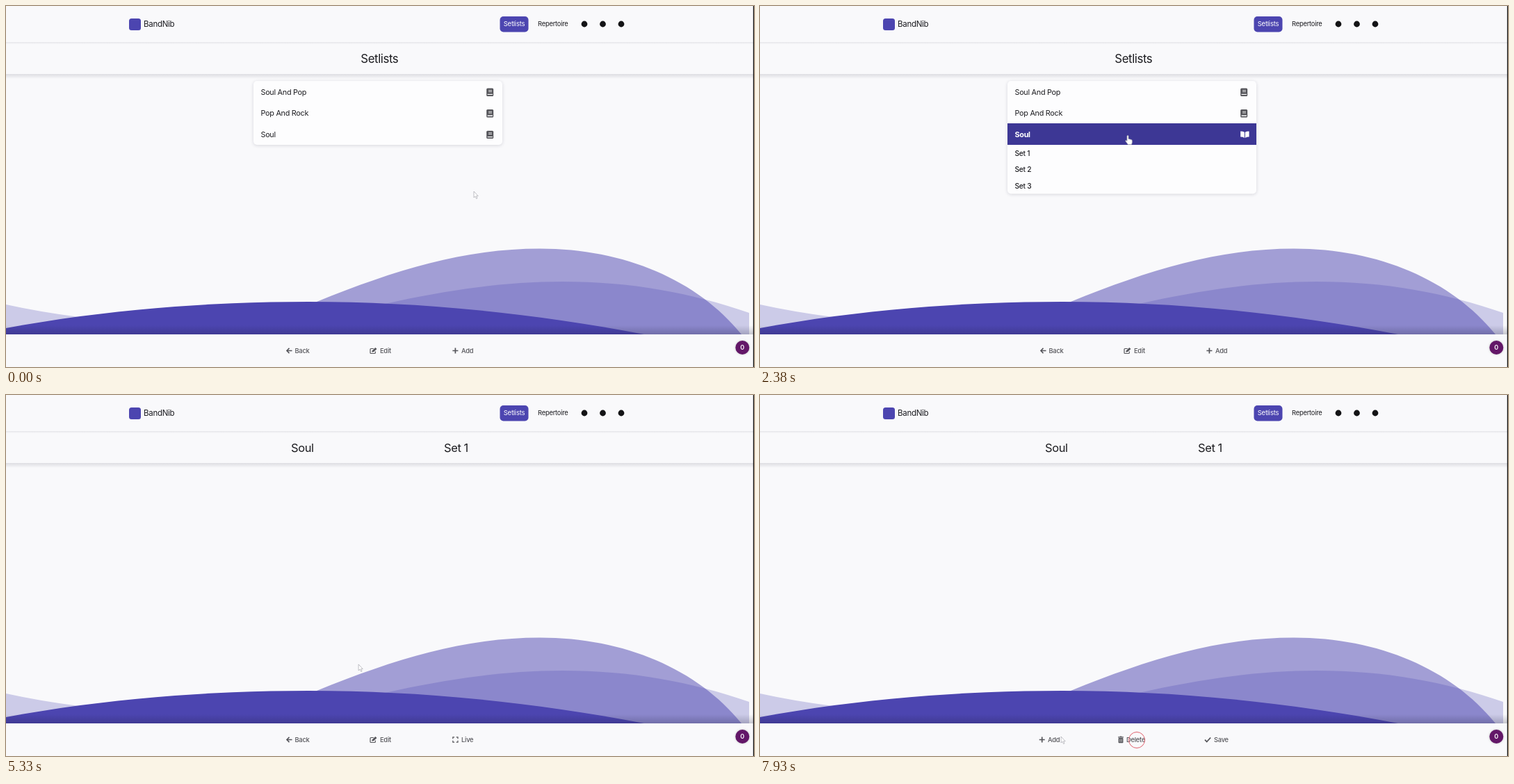
Recreate the animation shown at these times as an HTML page with a canvas. Size 1076 px wide and 520 px high, loop 8000 ms.

```html
<!DOCTYPE html>
<html lang="en">
<head>
<meta charset="utf-8">
<title>Setlists</title>
<style>
  html, body { margin: 0; width: 100%; height: 100%; overflow: hidden; background: #f9f9fb; }
  canvas { display: block; width: 1076px; height: 520px; }
</style>
</head>
<body>
<canvas id="stage"></canvas>
<script>
const W = 1076, H = 520, LOOP = 8000;
const PURPLE = '#4c45b0', DARK = '#3d3795', PAPER = '#f9f9fb', INK = '#1c1c20', GREY = '#55555a';
const OPEN_AT = 1950, SET_AT = 3830, EDIT_AT = 7000;

const canvas = document.getElementById('stage');
const ctx = canvas.getContext('2d');
const dpr = window.devicePixelRatio || 1;
canvas.width = W * dpr;
canvas.height = H * dpr;

// Cursor tip: time, x, y
const track = [
  [0, 673, 267], [200, 673, 267], [1250, 553, 191], [1450, 553, 191],
  [1750, 546, 183], [2050, 546, 183], [2380, 528, 187], [2850, 451, 216],
  [4700, 451, 216], [5800, 543, 498], [7400, 543, 498], [7900, 433, 492], [LOOP, 433, 492]
];
// Click rings: start, end, x, y
const clicks = [[1780, 2100, 546, 184], [3480, 3780, 452, 217], [6750, LOOP, 542, 497]];

const clamp = v => Math.max(0, Math.min(1, v));
const ease = v => v * v * (3 - 2 * v);

function cursorAt(t) {
  let i = 0;
  while (i < track.length - 2 && t >= track[i + 1][0]) i++;
  const [t0, x0, y0] = track[i], [t1, x1, y1] = track[i + 1];
  const k = ease(clamp((t - t0) / (t1 - t0)));
  return { x: x0 + (x1 - x0) * k, y: y0 + (y1 - y0) * k };
}

function inside(p, x, y, w, h) {
  return p.x >= x && p.x <= x + w && p.y >= y && p.y <= y + h;
}

function rect(x, y, w, h, color, r = 0) {
  ctx.fillStyle = color;
  ctx.beginPath();
  ctx.roundRect(x, y, w, h, r);
  ctx.fill();
}

function disc(x, y, r, color) {
  ctx.fillStyle = color;
  ctx.beginPath();
  ctx.arc(x, y, r, 0, 7);
  ctx.fill();
}

function text(str, x, mid, size, color = INK, weight = 400, align = 'left') {
  ctx.font = `${weight} ${size}px Inter, "Open Sans", sans-serif`;
  ctx.letterSpacing = `${-0.025 * size}px`;
  ctx.textAlign = align;
  ctx.fillStyle = color;
  ctx.fillText(str, x, mid + size * 0.36);
}

function stroke(d, color, width = 1.4) {
  ctx.strokeStyle = color;
  ctx.lineWidth = width;
  ctx.stroke(new Path2D(d));
}

function fill(d, color) {
  ctx.fillStyle = color;
  ctx.fill(new Path2D(d));
}

function at(x, y, draw) {
  ctx.save();
  ctx.translate(x, y);
  draw();
  ctx.restore();
}

function fade(y, h, from, to) {
  const g = ctx.createLinearGradient(0, y, 0, y + h);
  g.addColorStop(0, `rgba(20,20,45,${from})`);
  g.addColorStop(1, `rgba(20,20,45,${to})`);
  ctx.fillStyle = g;
  ctx.fillRect(0, y, 1075, h);
}

// Icons are drawn around their own centre
const icons = {
  back: c => stroke('M4 0H-3.4M0-3.6L-3.6 0L0 3.6', c, 1.5),
  add: c => stroke('M-4 0H4M0-4V4', c, 1.7),
  check: c => stroke('M-4 .2L-1.3 3L4.2-3', c, 1.8),
  live: c => stroke('M-3.6-1.3V-3.6H-1.3M1.3-3.6H3.6V-1.3M3.6 1.3V3.6H1.3M-1.3 3.6H-3.6V1.3', c, 1.2),
  edit: c => {
    stroke('M.5-3H-3.2Q-4.3-3-4.3-2V3Q-4.3 4-3.2 4H2Q3 4 3 3V1', c, 1.2);
    fill('M-2 2.2L-1.6 0L3-4.6L5.2-2.5L.5 1.8Z', c);
  },
  trash: c => {
    rect(-4, -4.3, 8, 1.3, c, 0.4);
    rect(-1.5, -5, 3, 1.2, c, 0.4);
    rect(-3.4, -2.5, 6.8, 7.3, c, 0.8);
    stroke('M-1.6-1V3.3M0-1V3.3M1.6-1V3.3', PAPER, 0.5);
  },
  book: () => {
    rect(-5, -5.7, 10, 11.4, GREY, 1.5);
    stroke('M-2.2-2.7H2.8M-2.2-.7H2.8', '#fdfdfe', 0.8);
    stroke('M-3.6 3.2H3.8', '#fdfdfe', 1.3);
  },
  open: () => {
    fill('M-.5-3.4Q-3-4.9-6.2-4.6V3.4Q-3 3.3-.5 4.7Z', '#fff');
    fill('M.5-3.4Q3-4.9 6.2-4.6V3.4Q3 3.3 .5 4.7Z', '#fff');
  },
  list: () => stroke('M-4-2.6H-2.6M-4 0H-2.6M-4 2.6H-2.6M-1.2-2.6H4M-1.2 0H4M-1.2 2.6H4', GREY, 0.9)
};

function icon(name, x, y, color = GREY) {
  at(x, y, () => icons[name](color));
}

function waves() {
  fill('M330 473L447 426C560 380 660 349.5 768 349.5C890 349.5 995 395 1058 473Z', 'rgba(76,69,176,.5)');
  fill('M0 473V430Q50 441 105 448C250 466 400 462 545 429C640 408 720 397 800 397C900 397 985 413 1069 442V473Z',
    'rgba(76,69,176,.26)');
  fill('M0 473V464C140 438 290 426 435 426C600 426 760 443 918 473Z', PURPLE);
}

function header() {
  fade(98, 7, 0.12, 0);
  rect(0, 0, 1075, 98, PAPER);
  fade(52, 3, 0.09, 0);
  rect(177, 18, 17, 17, PURPLE, 3.5);
  text('BandNib', 198, 26, 11.5);
  rect(710.5, 15, 41, 22.5, PURPLE, 5);
  text('Setlists', 731, 26, 9.5, '#fff', 400, 'center');
  text('Repertoire', 765, 26, 9.4);
  for (const x of [832, 858.5, 885]) disc(x, 26, 4.4, '#141416');
}

function setlists(t, p) {
  const k = ease(clamp((t - OPEN_AT) / 180));
  const open = k > 0;
  const h = 92 + 70.5 * k;
  text('Setlists', 537.3, 76, 16.8, INK, 400, 'center');

  ctx.save();
  ctx.shadowColor = 'rgba(30,30,60,.16)';
  ctx.shadowBlur = 5 * dpr;
  ctx.shadowOffsetY = dpr;
  rect(356, 108, 358, h, '#fdfdfe', 5);
  ctx.restore();

  ctx.save();
  ctx.beginPath();
  ctx.roundRect(356, 108, 358, h, 5);
  ctx.clip();
  if (open) {
    for (let i = 0; i < 3; i++) {
      const mid = 212 + 23.5 * i;
      if (inside(p, 356, mid - 11.7, 358, 23.4)) {
        rect(356, mid - 11.7, 358, 23, '#f4f4f5');
        icon('list', 697.8, mid);
      }
      text('Set ' + (i + 1), 366.5, mid, 10.2, INK, 500);
    }
    rect(355.5, 169, 359, 31, inside(p, 356, 169, 358, 31) ? DARK : PURPLE);
  }
  ['Soul And Pop', 'Pop And Rock', 'Soul'].forEach((name, i) => {
    const mid = 123.7 + 30.6 * i, active = open && i === 2;
    text(name, 366.5, mid, 10.8, active ? '#fff' : INK, active ? 700 : 400);
    if (active) icon('open', 697.4, mid + 0.3);
    else icon('book', 696.2, mid + 0.5);
  });
  ctx.restore();
}

function setPage() {
  text('Soul', 410, 76, 16.5);
  text('Set 1', 630, 76, 16.5);
}

// Footer items: icon, icon x, label, label x
const footers = [
  [['back', 407.5, 'Back', 415.5], ['edit', 528.3, 'Edit', 538], ['add', 646.4, 'Add', 655]],
  [['back', 407.5, 'Back', 415.5], ['edit', 528.3, 'Edit', 538], ['live', 646.4, 'Live', 655]],
  [['add', 405.7, 'Add', 414], ['trash', 519, 'Delete', 527], ['check', 644, 'Save', 653]]
];

function footer(page, p) {
  fade(460, 13, 0, 0.22);
  rect(0, 473, 1075, 47, PAPER);
  const hot = page === 1 && inside(p, 519, 485.5, 40, 22.5);
  if (hot) rect(519, 485.5, 40, 22.5, PURPLE, 5);
  for (const [name, ix, label, x] of footers[page]) {
    const color = hot && label === 'Edit' ? '#fff' : GREY;
    icon(name, ix, 496.5, color);
    text(label, x, 496.5, 9.3, color, 500);
  }
  ctx.save();
  ctx.shadowColor = 'rgba(0,0,0,.25)';
  ctx.shadowBlur = 3 * dpr;
  disc(1059.3, 492, 10, '#631768');
  ctx.restore();
  text('0', 1059.2, 492, 9, '#fff', 600, 'center');
}

function pointer(t, p) {
  const overList = t < SET_AT && inside(p, 356, 108, 358, t < OPEN_AT ? 92 : 162);
  const waiting = t >= SET_AT && t < 4700;
  const overEdit = t > SET_AT && t < 7400 && inside(p, 519, 485.5, 40, 22.5);
  const shape = overList || waiting || overEdit
    ? 'M0 0Q1.2-1.2 2 0V4.6Q3 4 3.9 5Q5 4.6 5.7 5.6Q7.2 5.4 7.3 7V9.4Q7.2 11 6.3 12.5H1.3Q.2 10.6-2 8Q-2.6 6.6-1.2 6.6L0 7.6Z'
    : 'M0 0V9L2 7.2L3.6 10.5L5 9.9L3.5 6.7H6.2Z';
  at(p.x, p.y, () => {
    fill(shape, '#fff');
    stroke(shape, '#a5a5ac', 0.7);
  });
}

function draw(t) {
  const p = cursorAt(t);
  const page = t < SET_AT ? 0 : t < EDIT_AT ? 1 : 2;
  ctx.setTransform(dpr, 0, 0, dpr, 0, 0);
  rect(0, 0, W, H, PAPER);
  waves();
  header();
  if (page) setPage();
  else setlists(t, p);
  footer(page, p);
  for (const [from, to, x, y] of clicks) {
    if (t < from || t >= to) continue;
    ctx.beginPath();
    ctx.arc(x, y, 11.5, 0, 7);
    ctx.strokeStyle = '#e0606c';
    ctx.lineWidth = 1;
    ctx.stroke();
  }
  pointer(t, p);
  rect(1074.8, 0, 1.2, H, '#111');
}

function tick(now) {
  draw(now % LOOP);
  requestAnimationFrame(tick);
}
requestAnimationFrame(tick);
</script>
</body>
</html>
```
